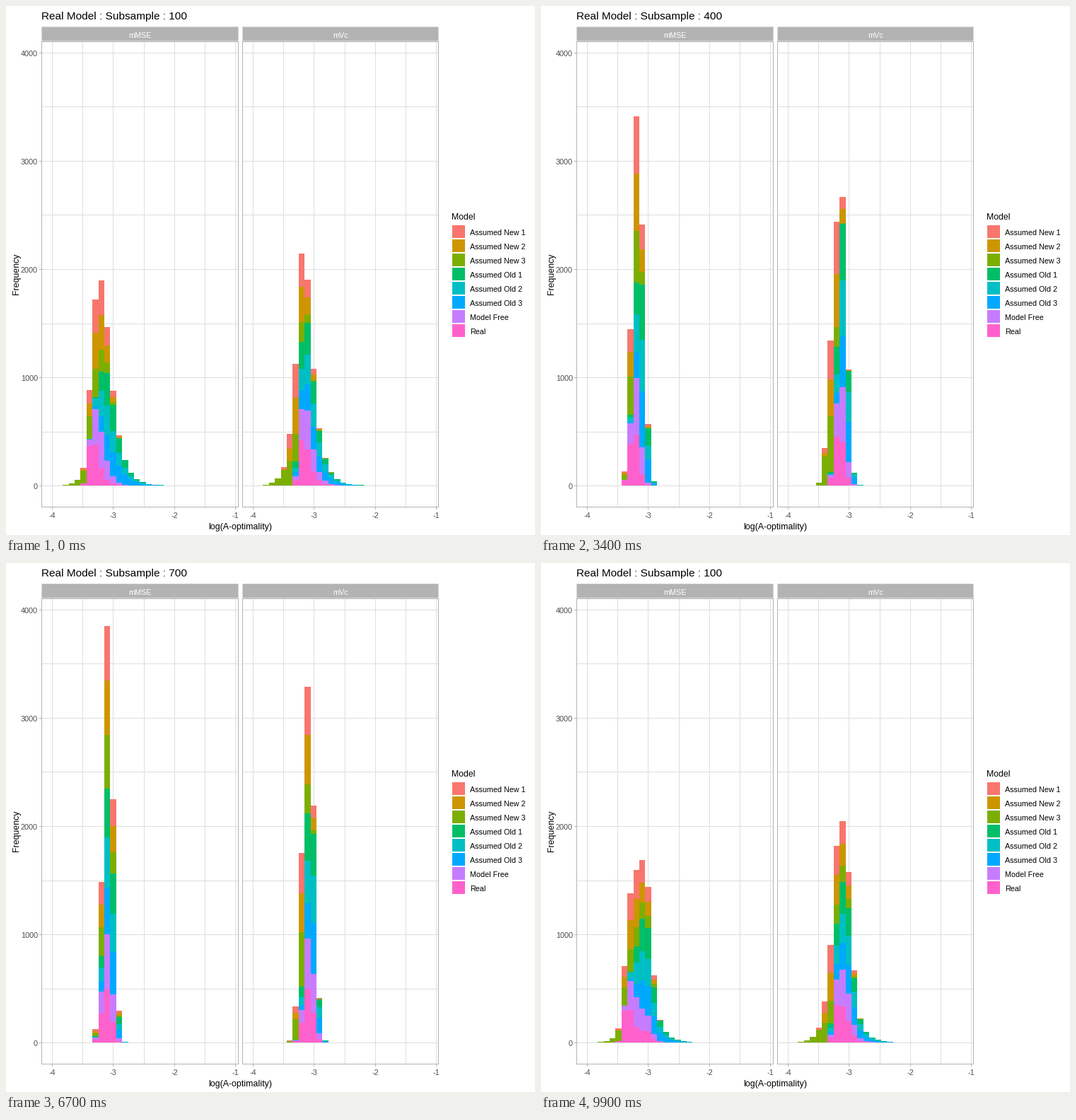
These frames come from a looping animation (748 px wide and 748 px high, 10 s). A matplotlib script:

```python
from math import erf, sqrt

import numpy as np
import matplotlib.pyplot as plt
from matplotlib.animation import FuncAnimation
from matplotlib.collections import PolyCollection
from matplotlib.patches import Rectangle

plt.rcParams["font.family"] = "Liberation Sans"

SIZE = 748
BINS = 30
BIN_W = 8.39
BIN_X = (63.45, 346.7)       # left edge of the first bin in each panel
PANELS = ((50, 328, "mMSE"), (334, 611, "mVc"))
BASE, SCALE = 678, 0.1532    # y of zero, pixels per count
BORDER, GRID, LABEL = "#B3B3B3", "#DEDEDE", "#4D4D4D"

# Bottom of the stack first: name, colour, offset of the centre in mMSE and
# in mVc, extra spread and skew at small subsamples (all in bin widths)
MODELS = (("Real", "#FF61CC", -.74, .10, .28, .42),
          ("Model Free", "#C77CFF", -.20, .45, .45, .35),
          ("Assumed Old 3", "#00A9FF", .90, 1.10, 1.10, .40),
          ("Assumed Old 2", "#00BFC4", .55, .83, .90, .38),
          ("Assumed Old 1", "#00BE67", .72, .60, .75, .38),
          ("Assumed New 3", "#7CAE00", -.68, -1.60, .90, -.10),
          ("Assumed New 2", "#CD9600", -.30, -.70, .45, .20),
          ("Assumed New 1", "#F8766D", -.26, -.75, .50, .10))

# Common centre of all models and how far the models lie apart
KEYS = (100, 200, 300, 500, 700, 900)
CENTRE = ((8.66, 8.42, 8.46, 9.01, 9.64, 10.25),
          (8.95, 8.72, 8.70, 9.04, 9.57, 10.22))
APART = ((1.9, 1.3, 1, .65, .34, .1),
         (1.15, 1.05, 1, .85, .6, .24))

SIZES = range(100, 1000, 100)
STARTS = (6, 18, 30, 41, 52, 63, 74, 85, 96)
STEPS = (6, 6, 5, 5, 5, 5, 5, 5, 5)

normal_cdf = np.vectorize(lambda z: 0.5 * (1 + erf(z / sqrt(2))))


def counts(n, panel, model):
    """1000 draws of a skewed normal, sorted into bins."""
    offset, wide, skew = model[2 + panel], model[4], model[5]
    mid = (np.interp(n, KEYS, CENTRE[panel])
           + offset * np.interp(n, KEYS, APART[panel]))
    spread = 0.61 + 0.00018 * n + wide * np.exp((100 - n) / 80)
    g = skew * np.exp((100 - n) / 140)
    stretch = 1 + g * (np.arange(BINS + 1) - mid) / spread
    z = np.log(np.maximum(stretch, 1e-9)) / g
    return 1000 * np.diff(normal_cdf(z))


def stacks(n):
    """Cumulative heights as [panel, bin, model]."""
    return np.array([np.cumsum([counts(n, p, m) for m in MODELS], axis=0).T
                     for p in range(2)])


HIST = [stacks(n) for n in SIZES]

fig = plt.figure(figsize=(SIZE / 100, SIZE / 100), dpi=100, facecolor="white")
ax = fig.add_axes([0, 0, 1, 1])
ax.set(xlim=(0, SIZE), ylim=(SIZE, 0))
ax.axis("off")


def box(x0, y0, x1, y1, color, z=1, smooth=False):
    ax.add_patch(Rectangle((x0, y0), x1 - x0, y1 - y0, fc=color, lw=0,
                           antialiased=smooth, snap=False, zorder=z))


def text(x, y, s, px, color="black", ha="left", **kw):
    return ax.text(x, y, s, fontsize=px * 0.72, color=color, ha=ha,
                   va="baseline", zorder=5, **kw)


for left, right, name in PANELS:
    for i in range(9):
        y = int(678.85 - 76.6 * i)
        box(left, y, right, y + 1, GRID)
    for i in range(7):
        x = int(left + 15.3 + 43.27 * i)
        box(x, 50, x + 1, 709, GRID)
        if i % 2 == 0:
            box(x, 709, x + 1, 712, BORDER)
            text(x + 0.5, 724, str(i // 2 - 4), 10.85, LABEL, "center")
    box(left, 50, right + 1, 51, BORDER, 4)
    box(left, 708, right + 1, 709, BORDER, 4)
    box(left, 50, left + 1, 709, BORDER, 4)
    box(right, 50, right + 1, 709, BORDER, 4)
    box(left + 0.5, 29.5, right + 0.5, 49.5, BORDER, smooth=True)
    text((left + right + 1) / 2, 45, name, 10.85, "white", "center")

for i in range(5):
    y = BASE - 153 * i
    box(47, y, 50, y + 1, BORDER)
    text(45, y + 5, str(1000 * i), 10.85, LABEL, "right")

text(331, 740, "log(A-optimality)", 12.45, ha="center")
text(18, 379, "Frequency", 12.45, ha="center", rotation=90,
     rotation_mode="anchor")
text(630, 302, "Model", 12.3)
for i, (name, color, *_) in enumerate(reversed(MODELS)):
    y = 320 + 20 * i
    box(631, y - 10, 649, y + 8, color)
    text(656, y + 4, name, 10.75)

title = text(50.5, 19, "", 15.45)
layers = [PolyCollection([], facecolors=m[1], linewidths=0,
                         antialiaseds=False, zorder=3) for m in MODELS]
for layer in layers:
    ax.add_collection(layer, autolim=False)

EDGES = [np.round(x + BIN_W * np.arange(BINS + 1)) for x in BIN_X]


def pose(frame):
    """Stack heights and nearest sample size at a given frame."""
    past = [i for i, s in enumerate(STARTS) if s <= frame]
    if not past:
        return HIST[0], SIZES[0]
    a = past[-1]
    b = (a + 1) % len(SIZES)
    p = min(1, (frame - STARTS[a] + 1) / STEPS[a])
    return HIST[a] * (1 - p) + HIST[b] * p, SIZES[b if p > 0.5 else a]


def update(frame):
    stack, size = pose(frame)
    title.set_text(f"Real Model : Subsample : {size}")
    tops = BASE - np.round(stack * SCALE)
    lows = np.concatenate([np.full((2, BINS, 1), BASE), tops[:, :, :-1]], axis=2)
    for m, layer in enumerate(layers):
        quads = []
        for p, edges in enumerate(EDGES):
            for k in range(BINS):
                y0, y1 = lows[p, k, m], tops[p, k, m]
                if y0 > y1:
                    x0, x1 = edges[k:k + 2]
                    quads.append([(x0, y0), (x1, y0), (x1, y1), (x0, y1)])
        layer.set_verts(quads)
    return [title, *layers]


anim = FuncAnimation(fig, update, frames=100, interval=100, repeat=True,
                     repeat_delay=0, blit=False)
plt.show()
```
